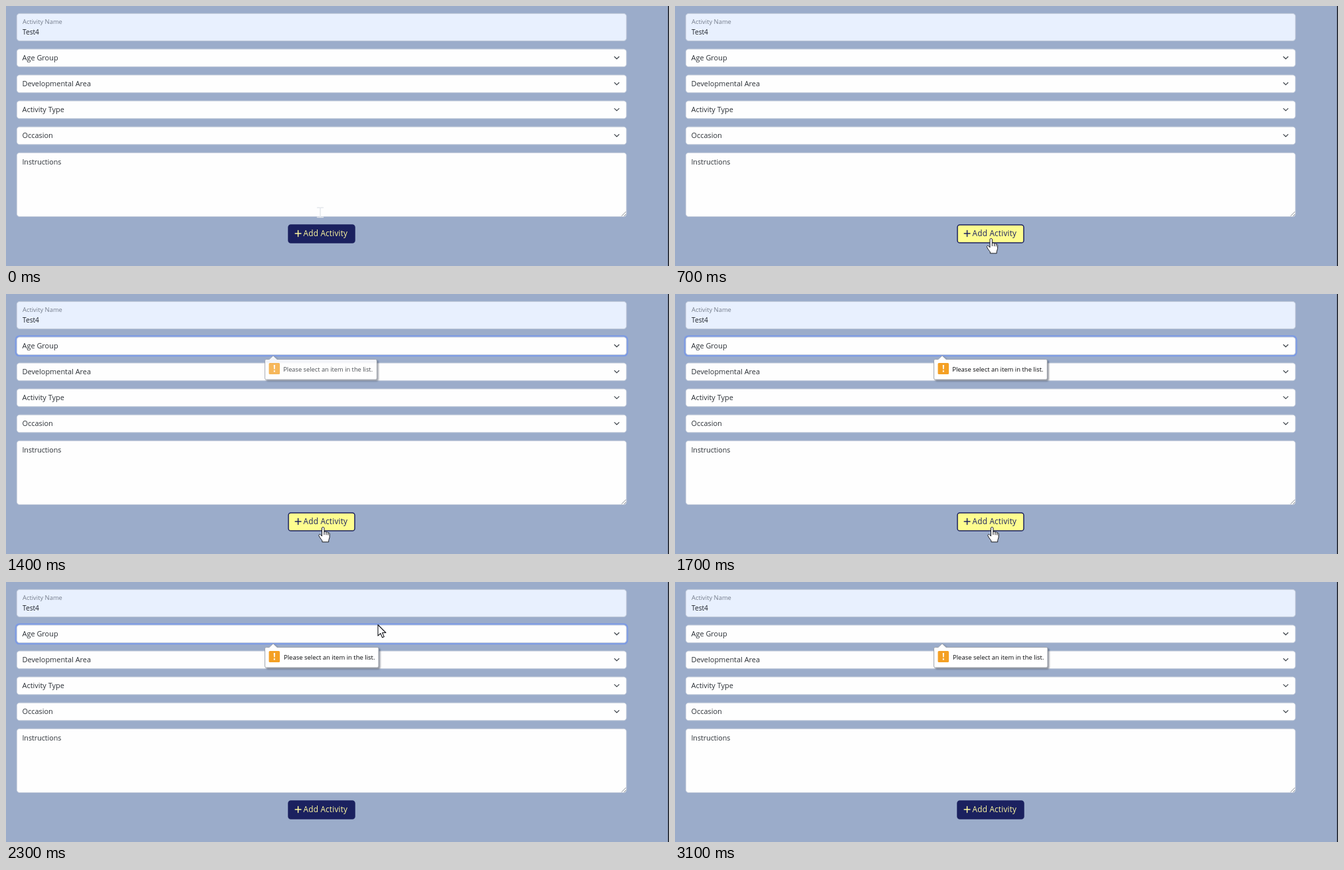
Write an HTML page that moves like this. It is 1000x392 px and loops after 3.2 s.

```html
<!DOCTYPE html>
<html lang="en">
<head>
<meta charset="utf-8">
<title>Add activity form</title>
<style>
  html, body { margin: 0; width: 100%; height: 100%; overflow: hidden; background: #9bacca; }
  svg { display: block; width: 100%; height: 100%; }
  text { font-family: "Open Sans", "Noto Sans", sans-serif; font-size: 10.95px; fill: #2b3036; }
  .field { fill: #fefefe; stroke: #c6cedc; }
  .line { fill: none; stroke-linecap: round; stroke-linejoin: round; }
  #bubble { filter: drop-shadow(2px 2px 1.3px rgba(40, 48, 65, .5)); }
</style>
</head>
<body>
<svg id="stage" viewBox="0 0 1000 392" preserveAspectRatio="none">
  <rect width="1000" height="392" fill="#9bacca"/>
  <rect x="998.6" width="1.4" height="392" fill="#10131a"/>

  <rect class="field" x="16.3" y="11.4" width="919.5" height="41" rx="4.2" style="fill:#e8f0fe"/>
  <text x="25" y="27.3" style="font-size:9.4px;fill:#747c8b">Activity Name</text>
  <text x="25" y="43" style="font-size:10.2px;fill:#1c2028">Test4</text>

  <rect id="ring" x="15" y="63.7" width="922" height="29.2" rx="5" fill="none" stroke="#7c9ae4" stroke-width="2.8"/>
  <g id="selects"></g>

  <rect class="field" x="16.3" y="221.3" width="919.5" height="96.2" rx="4.2"/>
  <text x="24.4" y="238.8" style="font-size:10.7px">Instructions</text>
  <path class="line" d="M928.8 316.4l6-6M932.4 316.6l2.6-2.6" stroke="#7d828a" stroke-width=".9"/>

  <g id="button">
    <rect id="face" x="426" y="330" width="100" height="27" rx="3.6" stroke-width="1.5"/>
    <path id="plus" class="line" d="M436.2 343h8.8M440.6 338.6v8.8" stroke-width="1.5"/>
    <text id="label" x="448.6" y="347.2" style="font-size:11.8px;font-weight:500;letter-spacing:.2px">Add Activity</text>
  </g>

  <g id="tip">
    <path id="bubble" fill="#fff" stroke="#a0a5ae" stroke-width="1"/>
    <g id="icon">
      <rect x="396.5" y="104" width="16.5" height="17" rx="1.5" fill="#f4a024"/>
      <path d="M403.7 107h2.2l-.4 6.6h-1.4zM403.8 115.3h2v2.1h-2z" fill="#fff"/>
    </g>
    <text id="message" y="117">Please select an item in the list.</text>
  </g>

  <g id="beam">
    <path class="line" d="M-4.5 -7h3.6l.9 .9 .9-.9h3.6M0 -6v13M-4.5 7.4h9" stroke="#e4e7ec" stroke-width="1.5"/>
  </g>
  <path id="arrow" d="M0 0V16.6L3.9 13L6.6 19.3L9.3 18.1L6.6 12H11.9Z" fill="#fff" stroke="#15171c" stroke-width="1.1" stroke-linejoin="round"/>
  <g id="hand" stroke="#15171c" stroke-width="1" stroke-linejoin="round">
    <path fill="#fff" d="M-2 1.4C-2-.5 1.4-.5 1.4 1.4V7.6C1.4 6.2 4.5 6.3 4.5 8.1C4.7 6.9 7.3 7.1 7.3 9C7.7 8 9.6 8.4 9.6 10.2V15.2C9.6 17 8.2 18.6 8.2 20V22.4H-1.6V20.4C-2.6 18.7-4.6 17-6.2 13.6C-7.6 11.2-5.3 10-3.8 11.6L-2 13.6Z"/>
    <path fill="none" d="M1.4 7.6v4M4.5 8.4v3.4M7.3 9.2v2.8"/>
  </g>
</svg>
<script>
const LOOP = 3200, STEP = 100;
const $ = id => document.getElementById(id);
const NAVY = [27, 33, 95], YELLOW = [254, 253, 143], PALE = [255, 249, 160],
      INK = [33, 37, 41], PAGE = [155, 172, 202];

$('selects').innerHTML = ['Age Group', 'Developmental Area', 'Activity Type', 'Occasion']
  .map((name, i) => `<g transform="translate(0 ${i * 39.05})">
    <rect class="field" x="16.3" y="65" width="919.5" height="26.6" rx="4.2"/>
    <text x="24.5" y="82.2">${name}</text>
    <path class="line" d="M917.8 76.5l3.4 3.3 3.4-3.3" stroke="#3d434a" stroke-width="1.2"/></g>`).join('');

const clamp = v => Math.max(0, Math.min(1, v));
const ramp = (t, from, to) => clamp((t - from) / (to - from));
const mix = (a, b, k) => a.map((v, i) => v + (b[i] - v) * k);
const rgb = c => `rgb(${c.map(Math.round)})`;
const show = (id, on) => $(id).setAttribute('visibility', on ? 'visible' : 'hidden');

// Pointer keys: time, x, y, shape
const keys = [
  [0, 474, 311, 'beam'], [100, 476, 325, 'arrow'], [300, 477, 350.5, 'hand'],
  [1000, 478.5, 351.5, 'hand'], [2000, 492, 322, 'arrow'], [2100, 516, 230, 'beam'],
  [2200, 545, 120, 'arrow'], [2300, 561, 64.5, 'arrow'], [2400, 556, 44, 'arrow'],
  [2500, 541, 22, 'arrow'], [2600, 522, 1, 'arrow'], [2700, 506, -17.5, 'arrow'],
  [2800, 500, -40, 'arrow']
];

function drawPointer(t) {
  const [, x, y, shape] = keys.filter(k => k[0] <= t).pop();
  for (const id of ['beam', 'arrow', 'hand']) show(id, id === shape);
  $(shape).setAttribute('transform', `translate(${x} ${y})`);
}

function drawButton(t) {
  const hover = ramp(t, 200, 380) - ramp(t, 1900, 2080);
  const press = ramp(t, 900, 1080) - ramp(t, 1200, 1300);
  const text = rgb(mix(mix(PALE, NAVY, hover), INK, press));
  $('face').setAttribute('fill', rgb(mix(mix(NAVY, YELLOW, hover), PAGE, press)));
  $('face').setAttribute('stroke', rgb(mix(NAVY, INK, press)));
  $('plus').setAttribute('stroke', text);
  $('label').style.fill = text;
}

const bubble = right =>
  `M392.5 98.5H397L403 93L409 98.5H${right - 2}q2 0 2 2V127q0 2-2 2H392.5q-2 0-2-2V100.5q0-2 2-2Z`;

function drawTip(t) {
  show('tip', t >= 1300);
  $('tip').setAttribute('opacity', t < 1400 ? .4 : t < 1500 ? .88 : 1);
  $('bubble').setAttribute('d', bubble(558 + 4 * ramp(t, 1200, 1800)));
  $('icon').setAttribute('opacity', t < 1500 ? .85 : 1);
  const msg = $('message');
  msg.setAttribute('x', 418.2 + .8 * ramp(t, 1700, 2000));
  msg.style.fontSize = 9.3 + .18 * ramp(t, 1400, 1700) + 'px';
  msg.style.fill = t < 1500 ? '#33373d' : '#08090b';
}

function draw(now) {
  const t = Math.floor((now % LOOP) / STEP) * STEP;
  $('ring').setAttribute('opacity', ramp(t, 1200, 1380) - ramp(t, 2900, 3080));
  drawButton(t);
  drawTip(t);
  drawPointer(t);
}

const start = performance.now();
function tick() {
  draw(performance.now() - start);
  requestAnimationFrame(tick);
}
tick();
</script>
</body>
</html>
```
